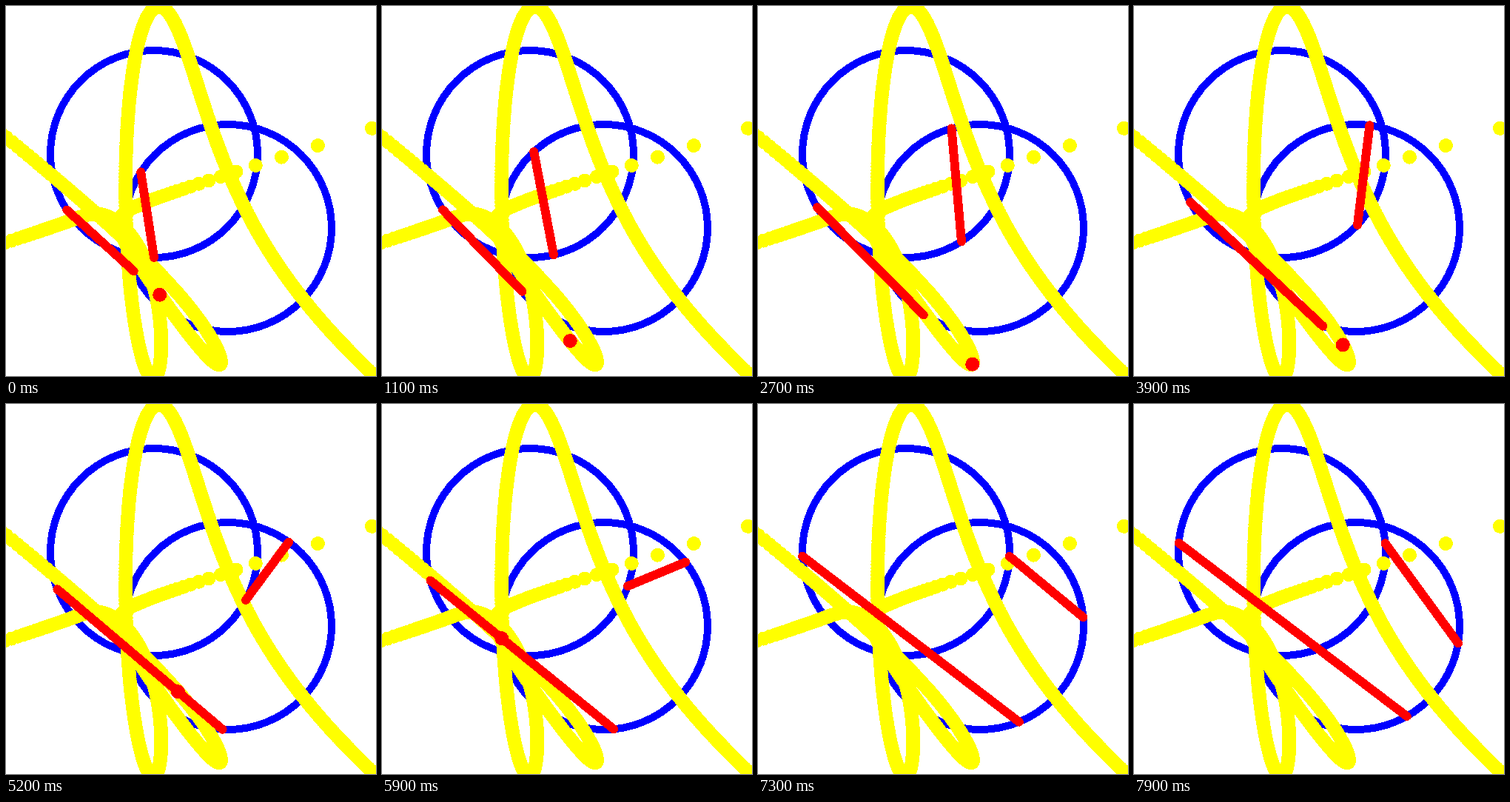
An HTML page for the animation above (8 s loop, 500 px wide and 500 px high).

```html
<!DOCTYPE html>
<html lang="en">
<head>
<meta charset="utf-8">
<title>Crossing lines</title>
<style>
  html, body { margin: 0; width: 100%; height: 100%; overflow: hidden; background: #fff; }
  svg { display: block; width: 100vw; height: 100vh; }
  svg * { fill: none; stroke-linecap: round; shape-rendering: crispEdges; }
  .ring { stroke: #00f; stroke-width: 10; }
  #trail { stroke: #ff0; stroke-width: 19; }
  .bar { stroke: #f00; stroke-width: 12; }
  #dot { fill: #f00; }
</style>
</head>
<body>
<svg viewBox="0 0 500 500">
  <circle class="ring" cx="200" cy="200" r="140"/>
  <circle class="ring" cx="300" cy="300" r="140"/>
  <path id="trail"/>
  <path class="bar" id="bars"/>
  <circle id="dot" r="9.5"/>
</svg>
<script>
const RADIUS = 140;
const STEP_MS = 100, STEPS = 80, STEPS_PER_TURN = 300;
const TRAIL_DOTS = 1800, TRAIL_PHASE = -0.024 * Math.PI / 180;
const [trail, bars, dot] = ['trail', 'bars', 'dot'].map(id => document.getElementById(id));

const onRing = (center, angle) => ({
  x: center + RADIUS * Math.cos(angle),
  y: center + RADIUS * Math.sin(angle)
});

// Two lines, each joining a point of the first ring to one of the second.
function linesAt(theta) {
  const down = Math.PI / 2, up = 3 * Math.PI / 2;
  return [
    [onRing(200, down + 1 + theta - Math.sin(theta)), onRing(300, up - 2 - theta)],
    [onRing(200, down - theta), onRing(300, up + theta - Math.cos(theta))]
  ];
}

function crossing([[a, b], [c, d]]) {
  const ux = b.x - a.x, uy = b.y - a.y;
  const vx = d.x - c.x, vy = d.y - c.y;
  const s = ((c.x - a.x) * vy - (c.y - a.y) * vx) / (ux * vy - uy * vx);
  return { x: a.x + s * ux, y: a.y + s * uy };
}

const inView = v => v > -20 && v < 520;

function drawTrail() {
  let path = '';
  for (let i = 0; i < TRAIL_DOTS; i++) {
    const { x, y } = crossing(linesAt(i / TRAIL_DOTS * 2 * Math.PI + TRAIL_PHASE));
    if (inView(x) && inView(y)) path += `M${x.toFixed(2)} ${y.toFixed(2)}h0`;
  }
  trail.setAttribute('d', path);
}

function draw(ms) {
  const step = Math.floor(ms / STEP_MS) % STEPS;
  const lines = linesAt(step / STEPS_PER_TURN * 2 * Math.PI);
  const { x, y } = crossing(lines);
  bars.setAttribute('d', lines.map(([p, q]) => `M${p.x} ${p.y}L${q.x} ${q.y}`).join(''));
  dot.setAttribute('cx', x);
  dot.setAttribute('cy', y);
}

drawTrail();
draw(0);
let start;
requestAnimationFrame(function tick(now) {
  start ??= now;
  draw(now - start);
  requestAnimationFrame(tick);
});
</script>
</body>
</html>
```
